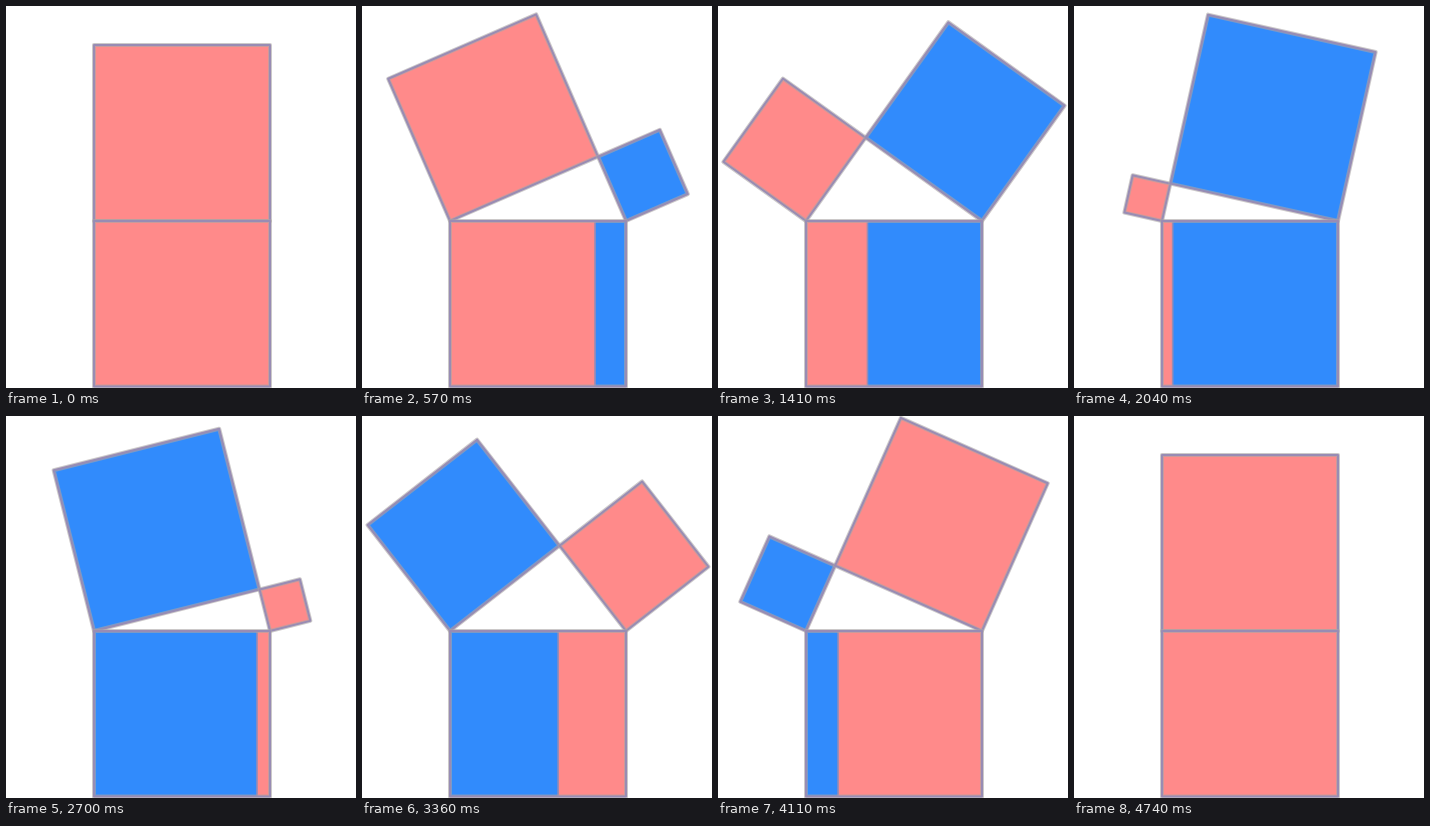
An HTML page with a canvas for the animation above (4770 ms loop, 350 px wide and 382 px high).

```html
<!DOCTYPE html>
<html lang="en">
<head>
<meta charset="utf-8">
<title>Squares on a right triangle</title>
<style>
html, body { margin: 0; width: 100%; height: 100%; overflow: hidden; background: #fff; }
canvas { display: block; }
</style>
</head>
<body>
<canvas id="stage" width="350" height="382"></canvas>
<script>
const ctx = document.getElementById('stage').getContext('2d');
const PINK = '#ff8a8a', BLUE = '#318bfc', EDGE = '#988cb4', HALO = 'rgba(170, 165, 165, 0.6)';
const LOOP = 4770, HALF = 2370, STEP = 30;
const LEFT = 88, RIGHT = 264, BASE = 215, FLOOR = 380.5, SIDE = RIGHT - LEFT;

// Time in ms and angle at the left corner in degrees
const TURN = [[0, 0], [330, 14.1], [570, 23.5], [990, 37.9], [1410, 54.4], [1740, 66], [2370, 90]];

function angleAt(t) {
  const i = Math.max(1, TURN.findIndex(key => key[0] >= t));
  const [t0, a0] = TURN[i - 1], [t1, a1] = TURN[i];
  return (a0 + (a1 - a0) * (t - t0) / (t1 - t0)) * Math.PI / 180;
}

function stroke(color, width) {
  ctx.strokeStyle = color;
  ctx.lineWidth = width;
  ctx.stroke();
}

function outline() {
  stroke(HALO, 4);
  stroke(EDGE, 2);
}

// Box standing on the edge from (x0, y0) to (x1, y1)
function box(x0, y0, x1, y1, scale, fill) {
  const nx = (y1 - y0) * scale, ny = (x0 - x1) * scale;
  ctx.beginPath();
  ctx.moveTo(x0, y0);
  ctx.lineTo(x1, y1);
  ctx.lineTo(x1 + nx, y1 + ny);
  ctx.lineTo(x0 + nx, y0 + ny);
  ctx.closePath();
  ctx.fillStyle = fill;
  ctx.fill();
  outline();
}

function base(split, first, second) {
  const height = FLOOR - BASE;
  ctx.fillStyle = first;
  ctx.fillRect(LEFT, BASE, split - LEFT, height);
  ctx.fillStyle = second;
  ctx.fillRect(split, BASE, RIGHT - split, height);
  ctx.fillStyle = EDGE;
  ctx.fillRect(split - 0.8, BASE, 1.6, height);
  ctx.beginPath();
  ctx.rect(LEFT, BASE, SIDE, height);
  outline();
}

function draw(t) {
  const swapped = t >= HALF;
  const [first, second] = swapped ? [BLUE, PINK] : [PINK, BLUE];
  const a = angleAt(swapped ? t - HALF : t);
  const x = LEFT + SIDE * Math.cos(a) ** 2;
  const y = BASE - SIDE * Math.sin(a) * Math.cos(a);
  const scale = 1 - 0.045 * Math.sin(3 * a) * Math.cos(a);

  ctx.fillStyle = '#fff';
  ctx.fillRect(0, 0, 350, 382);
  ctx.lineJoin = 'round';
  box(LEFT, BASE, x, y, scale, first);
  box(x, y, RIGHT, BASE, scale, second);
  base(x - 3 * Math.sin(4 * a), first, second);
}

const start = performance.now();
function tick() {
  const t = (performance.now() - start) % LOOP;
  draw(Math.floor(t / STEP) * STEP);
  requestAnimationFrame(tick);
}
tick();
</script>
</body>
</html>
```
